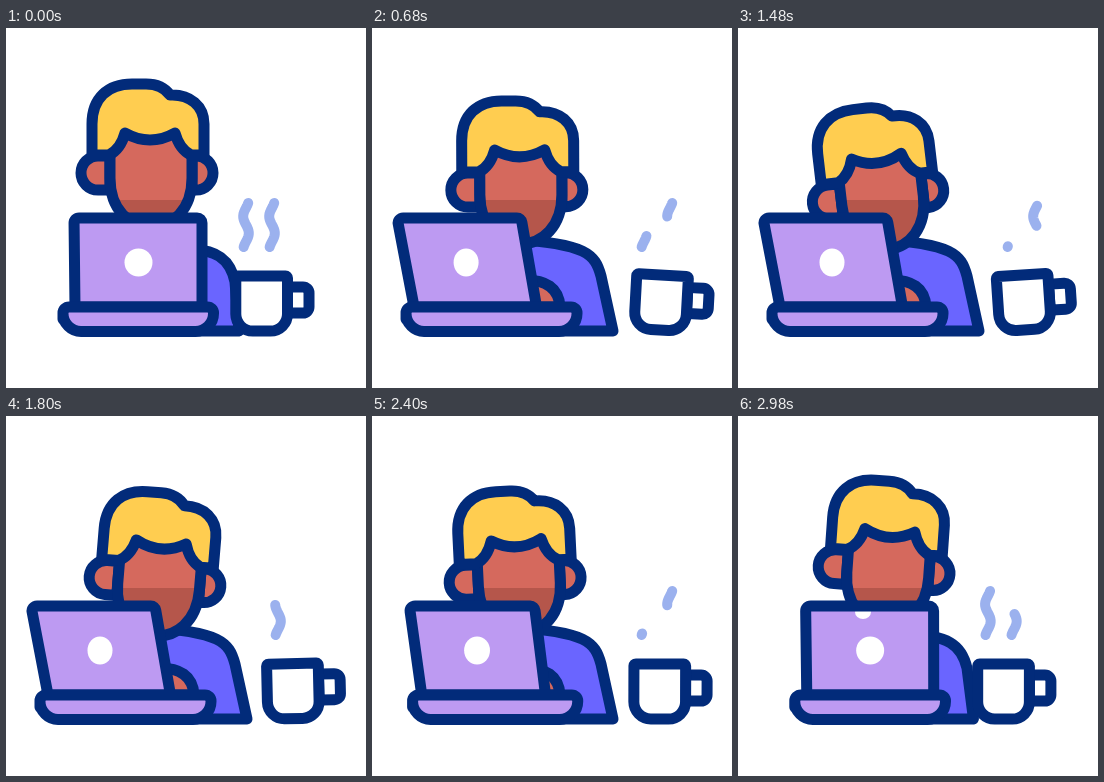
An HTML page with a canvas for the animation above (3000 ms loop, 360 by 360 pixels).

```html
<!DOCTYPE html>
<html lang="en">
<head>
<meta charset="utf-8">
<title>Working with coffee</title>
<style>
html, body { margin: 0; width: 100%; height: 100%; overflow: hidden; background: #fff; }
canvas { display: block; width: 360px; height: 360px; }
</style>
</head>
<body>
<canvas id="stage" width="360" height="360"></canvas>
<script>
const ctx = document.getElementById('stage').getContext('2d');
const LOOP = 3000, STEP = 20;
const NAVY = '#022b7a', HAIR = '#ffcd50', SKIN = '#d5695d', SHADE = '#b5564b';
const LILAC = '#bd9af2', BLUE = '#6a65ff', STEAM = '#9bb1ee';

// turning points of the head: [time, degrees]
const headTilt = [[0, 0], [430, -4.3], [940, 4.1], [1440, -7], [1840, 5], [2230, -7], [2680, 6.5], [3150, 3]];

// drain: when the first wisp starts to fade; hold: delay between tip and tail
const wisps = [
  { x: 240, drain: 140, first: 560, gap: 912, hold: 390 },
  { x: 266, drain: 430, first: 1030, gap: 860, hold: 300 }
];
const RISE = 480, FADE = 310;

const clamp = v => Math.max(0, Math.min(1, v));
const span = (t, a, b) => clamp((t - a) / (b - a));
const easeOut = s => Math.sin(s * Math.PI / 2);
const easeInOut = s => (1 - Math.cos(s * Math.PI)) / 2;
const mix = (a, b, k) => a + (b - a) * k;
const rad = d => d * Math.PI / 180;

function sample(keys, t) {
  const i = keys.findIndex(k => k[0] > t);
  const [t0, v0] = keys[i - 1], [t1, v1] = keys[i];
  return mix(v0, v1, easeInOut(span(t, t0, t1)));
}

// out quickly, back near the end of the loop
const away = (t, arrive, leave, home) =>
  easeOut(span(t, 0, arrive)) * (1 - easeInOut(span(t, leave, home)));

// the cup tips over once, then swings to rest
function cupTilt(t) {
  const late = t - 1060;
  if (late < 0) return 10 * easeInOut(span(t, 450, 1060));
  return 10 * Math.exp(-late / 620) * Math.cos(late / 545 * Math.PI);
}

function paint(path, fill, line = NAVY) {
  if (fill) { ctx.fillStyle = fill; ctx.fill(path); }
  if (line) { ctx.strokeStyle = line; ctx.stroke(path); }
}

function polygon(points, radii) {
  const p = new Path2D(), n = points.length;
  const [a, b] = [points[n - 1], points[0]];
  p.moveTo((a[0] + b[0]) / 2, (a[1] + b[1]) / 2);
  points.forEach((c, i) => {
    const d = points[(i + 1) % n];
    p.arcTo(c[0], c[1], d[0], d[1], radii[i]);
  });
  p.closePath();
  return p;
}

const box = (l, t, r, b, radii) => polygon([[l, t], [r, t], [r, b], [l, b]], radii);
const jaw = top => new Path2D(`M104 ${top}V150C104 182 124 199 145 199S186 182 186 150V${top}`);

const face = jaw(102), faceLine = jaw(124);
const ears = new Path2D('M104 128H92a17 17 0 0 0 0 34H104ZM186 128H190a17 17 0 0 1 0 34H186Z');
const hair = new Path2D('M86 127V96C86 70 102 56 126 56H140C151 56 159 60 164 67' +
  'C184 66 198 78 198 96V127H185C177 123 172 116 169 105Q144 119 119 105C116 116 111 123 103 127Z');
const hand = new Path2D('M150 252C174 251 187 260 188 279H150Z');
const cupBody = box(229.8, 248, 281.5, 303, [2, 2, 17, 17]);
const cupHandle = box(281.5, 259, 303, 285, [2, 6, 6, 2]);

function drawBody(k) {
  const m = (a, b) => mix(a, b, k);
  const p = new Path2D();
  p.moveTo(m(180, 140), m(222, 211));
  p.bezierCurveTo(m(208, 215), m(220, 216), m(224, 223), m(230, 226), m(229, 229), m(254, 248));
  p.lineTo(m(233, 241), 303);
  p.lineTo(155, 303);
  paint(p, BLUE);
}

function drawHead(t) {
  const k = away(t, 880, 2680, 3246), tilt = sample(headTilt, t);
  ctx.save();
  ctx.translate(141 + 4.3 * k, 190 + (18 + 0.11 * tilt * tilt) * k);
  ctx.rotate(rad(tilt));
  ctx.translate(-141, -190);
  paint(ears, SKIN);
  paint(face, SKIN, null);
  // the shade stays level while the head rocks
  ctx.save();
  ctx.clip(face);
  ctx.setTransform(1, 0, 0, 1, 0, 0);
  ctx.fillStyle = SHADE;
  ctx.fillRect(60, 172, 180, 80);
  ctx.restore();
  paint(faceLine);
  paint(hair, HAIR);
  ctx.restore();
}

function drawLaptop(t) {
  const k = away(t, 712, 2040, 3040);
  const m = (a, b) => mix(a, b, k);
  const lid = polygon([[m(68, 25), 190], [m(196, 149), 190], [m(196, 164.5), 279], [m(69, 42), 279]], [5, 5, 2, 2]);
  paint(lid, LILAC, null);
  ctx.fillStyle = '#fff';
  ctx.beginPath();
  ctx.ellipse(m(132.5, 94), 234.5, m(14, 12.5), 14, 0, 0, 7);
  ctx.fill();
  const glint = span(t, 2880, 2980);
  ctx.beginPath();
  ctx.ellipse(125, 196, 8 * glint, 7 * glint, 0, 0, 7);
  ctx.fill();
  paint(lid);
  paint(box(m(57, 34), 279, m(207.5, 205), 303.5, [6, 6, 18, 18]), LILAC);
}

function drawCup(t, slide) {
  const a = cupTilt(t);
  ctx.save();
  ctx.translate(256 + slide, 303 - 0.3 * Math.abs(a));
  ctx.rotate(rad(a));
  ctx.translate(-256, -303);
  paint(cupHandle, '#fff');
  paint(cupBody, '#fff');
  ctx.restore();
}

function drawWisp(x, tail, tip) {
  if (tip <= tail) return;
  const p = new Path2D();
  for (let i = 0; i <= 24; i++) {
    const u = mix(tail, tip, i / 24);
    p.lineTo(x + 2.8 * Math.sin(u * 8.2 - 1), 219 - 44 * u);
  }
  ctx.lineWidth = 10;
  paint(p, null, STEAM);
}

function drawSteam(t, slide) {
  for (const { x, drain, first, gap, hold } of wisps) {
    drawWisp(x + slide, span(t, drain, drain + FADE + 50), 1);
    for (let n = 0; n < 3; n++) {
      const age = t - first - n * gap;
      // the last wisp is still whole when the loop ends
      const tail = n < 2 ? span(age, hold, hold + FADE) : 0;
      if (age >= 0) drawWisp(x + slide, tail, span(age, 0, RISE));
    }
  }
}

function draw(t) {
  ctx.setTransform(1, 0, 0, 1, 0, 0);
  ctx.fillStyle = '#fff';
  ctx.fillRect(0, 0, 360, 360);
  ctx.lineWidth = 11;
  ctx.lineCap = ctx.lineJoin = 'round';
  const k = away(t, 650, 2680, 3160), slide = 32 * k;
  drawBody(k);
  paint(hand, SKIN);
  drawHead(t);
  drawLaptop(t);
  drawCup(t, slide);
  drawSteam(t, slide);
}

const start = performance.now();
function frame(now) {
  const t = Math.max(0, now - start) % LOOP;
  draw(Math.floor(t / STEP) * STEP);
  requestAnimationFrame(frame);
}
draw(0);
requestAnimationFrame(frame);
</script>
</body>
</html>
```
